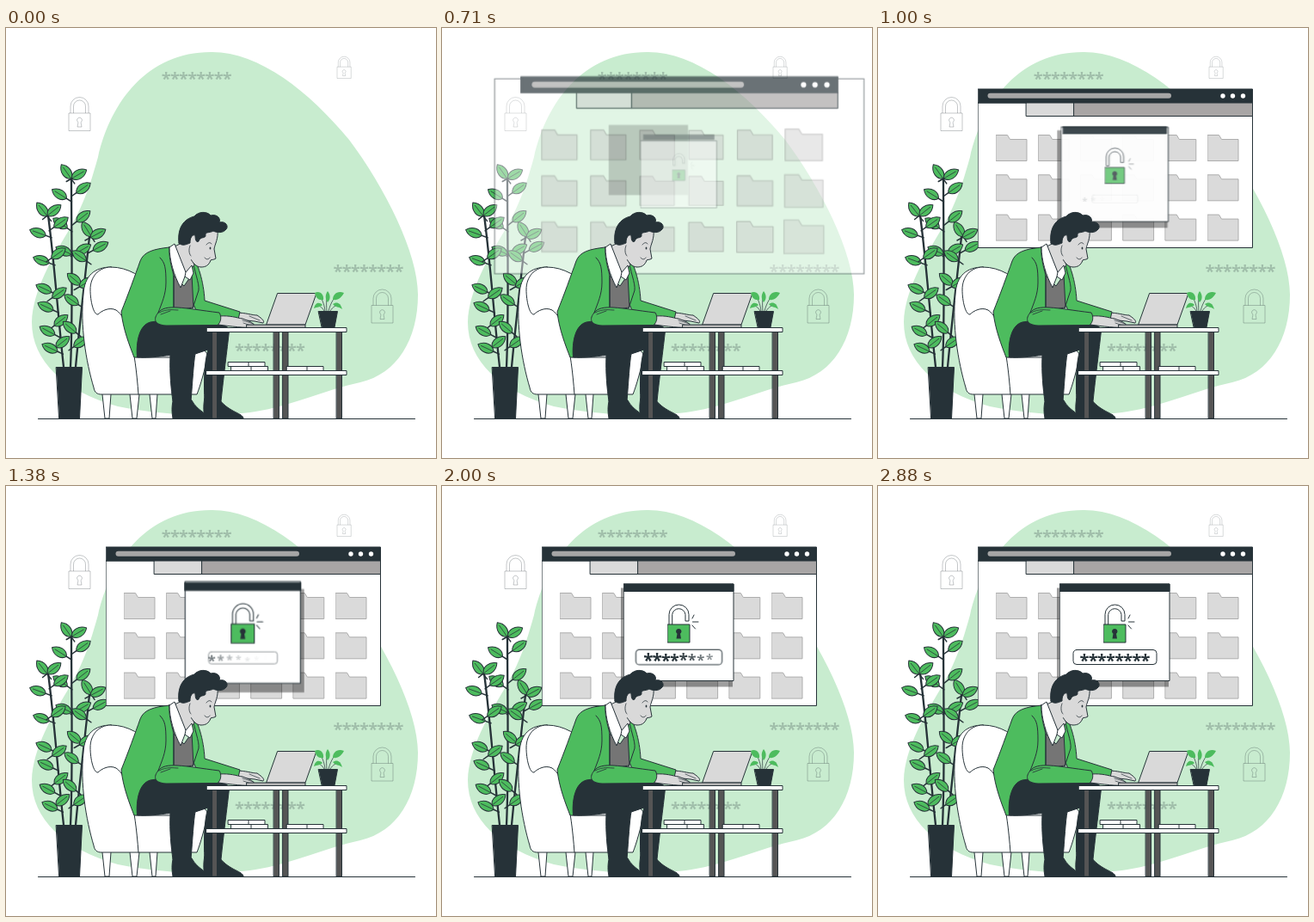
These frames come from a looping animation (500 by 500 pixels, 2.96 s). An HTML page:

```html
<!DOCTYPE html>
<html lang="en">
<head>
<meta charset="utf-8">
<title>Password entry</title>
<style>
html, body { margin: 0; width: 100%; height: 100%; overflow: hidden; background: #fff; }
svg { display: block; width: 100%; height: 100%; }
.ink { fill: none; stroke: #263238; stroke-width: 1; stroke-linejoin: round; stroke-linecap: round; }
.dark { fill: #263238; }
.green { fill: #4dbc5e; }
.white { fill: #fff; }
.skin { fill: #d9d9d9; }
.gray { fill: #555; }
.flat { stroke: none; }
.faint { fill: none; stroke: #263238; stroke-opacity: .27; }
text { font: 700 20px "Open Sans", "Liberation Sans", sans-serif; text-anchor: middle; fill: #263238; stroke: none; }
[data-z] { transform-box: fill-box; transform-origin: center; }
[data-o] { transform-box: view-box; }
</style>
</head>
<body>
<svg viewBox="0 0 500 500">
  <defs>
    <g id="lock">
      <path d="M0 0H25V20.5H0ZM2 0V-8A10.5 10.5 0 0 1 23-8V0M5.5 0V-8A7 7 0 0 1 19.5-8V0"/>
      <path d="M11 10.6A2.9 2.9 0 1 1 14 10.6L15 16H10Z"/>
    </g>
    <g id="leaf">
      <path d="M-17 0H-10" stroke-width="1.500"/>
      <path class="green" d="M-10 0C-6-7 4-7 10 0C4 7-6 7-10 0Z"/>
      <path d="M-10 0H6" stroke-width=".7"/>
    </g>
  </defs>

  <path fill="#c8eccf" d="M238 28C293 27 352 73 399 130C441 186 479 262 479 310C479 362 455 402 412 412C370 421 330 440 290 446C250 452 190 452 130 440C67 422 30 387 30 342C31 305 55 265 75 232C93 200 100 175 107 150C122 85 165 28 238 28Z"/>
  <g class="faint">
    <use href="#lock" x="73" y="99"/>
    <use href="#lock" x="425" y="322.5"/>
    <use href="#lock" transform="translate(385 45.2)scale(.65)"/>
  </g>
  <g id="rows" opacity=".24"></g>
  <path class="ink" d="M37.500 454.500H475.500"/>

  <g class="ink" id="plant">
    <g stroke-width="2.300">
      <path d="M75 394C78 330 76 250 76 174"/>
      <path d="M67 394C60 330 56 270 49 218"/>
      <path d="M81 394C86 340 92 290 97 243"/>
    </g>
    <g id="leaves"></g>
    <path class="dark" d="M58.500 394.500H88.500L85.500 454H62Z"/>
  </g>

  <!-- browser window -->
  <g class="ink" data-z="475 500 1.5" data-o="276 163">
    <path class="white" data-z="480 500 1.5" d="M116.500 87H435.500V255.500H116.500Z"/>
    <g id="folders" stroke="#adadad"></g>
    <path class="dark" d="M116.500 71H435.500V87H116.500Z"/>
    <rect class="flat" x="127.500" y="75.800" width="213.500" height="6" rx="3" fill="#a6a6a6"/>
    <g class="white flat"><circle cx="401" cy="79" r="2.700"/><circle cx="412.500" cy="79" r="2.700"/><circle cx="424.500" cy="79" r="2.700"/></g>
    <path fill="#dadada" d="M172.500 87H228V102.500H172.500Z"/>
    <path fill="#a8a5a5" d="M228 87H435.500V102.500H228Z"/>
  </g>

  <!-- password dialog -->
  <g class="ink" data-z="30 1480 .5" data-o="275 170">
    <rect class="flat" data-z="0 1480 .5" data-o="0 0" x="208" y="118.500" width="130" height="115" fill="#000" fill-opacity=".38"/>
    <rect class="white" data-z="30 1480 .5" x="211.500" y="114" width="127.500" height="112.500"/>
    <rect class="dark" data-z="110 1480 .5" x="211.500" y="114" width="127.500" height="8.500"/>
    <path class="white" data-z="230 1480 .5" d="M264 161V149.500A11.500 11.500 0 0 1 287 149.500V157H283V149.500A7.700 7.700 0 0 0 267.700 149.500V161Z"/>
    <g data-z="220 1480 .5">
      <path class="green" d="M262.500 161H288V182H262.500Z"/>
      <path class="dark flat" d="M273.500 171.800A3.200 3.200 0 1 1 277 171.800L278 177.500H272.500Z"/>
    </g>
    <path data-z="400 1480 .5" d="M291 154L293 150M291.500 158H298M291 162L294.500 166"/>
    <rect class="white" data-z="740 1480 .5" x="227" y="190.500" width="97" height="17" rx="4"/>
    <g id="typed"></g>
  </g>

  <!-- chair -->
  <g class="ink white">
    <path class="white" d="M112 426L115 454H120L122 426M144 426L147 454H152L155 426M167 426L170 454H174L176 426"/>
    <path class="white" d="M122 278C103 278 91 288 90 310C86 345 93 388 102 418C103 424 106 426 111 426H222C226 416 231 398 235 380L170 300C158 290 143 278 122 278Z"/>
    <path d="M122 278C107 278 98 290 98 304C98 318 102 334 107 333C111 329 120 324 128 328C142 337 150 372 154 426M152 383H196"/>
  </g>

  <!-- far desk legs -->
  <path class="ink gray" d="M311.500 353.500H317.500V454H311.500ZM322 353.500H328V454H322ZM384.500 353.500H390.500V454H384.500Z"/>

  <!-- person -->
  <g class="ink">
    <path class="dark" d="M195 430C192 440 193 448 194 454H235C235 448 223 446 216 433Z"/>
    <path class="dark" d="M231 430C229 440 230 448 231 454H276C276 448 260 447 249 433Z"/>
    <path class="dark" d="M160 345C150 358 151 378 153 383C173 384 188 380 191 381C190 400 192 420 194 434H215C217 410 218 390 220 379L235 374C230 390 230 415 231 434H250C253 405 257 375 259.500 352C258 344 245 341 235 341L175 338Z"/>
    <path class="skin" d="M268 331C279 331 286 334 292 334C298 338 301 341 299 343L289 341L270 339Z"/>
    <path class="green" d="M215 262C223 272 230 295 231 317L272 330L270 339L222 331C212 310 211 280 215 262Z"/>
    <path d="M194 287L207 300L216 287L218 325L195 328Z" fill="#757575"/>
    <path class="green" d="M190 255C172 257 160 260 156 271C150 288 142 310 134 330C136 350 144 370 149 383L152.500 383C151 365 155 345 168 342L195 338L195 288C192 276 189 265 190 255Z"/>
    <path d="M190 255L195 286L195 326M216 264C219 285 225 296 224 305L217 326M179 267C185 273 186 279 186 296C186 310 181 320 177 331"/>
    <path class="skin" d="M196 254L211 247L219 276L208 285Z"/>
    <path class="white" d="M190 255L196 251L209 284L216 276L218 285L214 293L208 289L203 302C195 287 190 270 190 255Z"/>
    <path d="M209 284L208 289"/>
    <path class="skin" d="M248 335C261 334 268 337 275 338C283 341 291 344 288 348C279 349 261 347 247 345Z"/>
    <path d="M276 343L285 346M275 340L288 344M283 335L295 340" stroke-width=".7"/>
    <path class="green" d="M177 331C185 320 207 326 248 331C251 336 250 342 246 345.500L186 346C172 345 171 338 177 331Z"/>
    <path d="M178 331C188 326 194 328 200 328M180 333L191 329" stroke-width=".8"/>
    <path class="skin" d="M220 234L246 235C247 245 243 251 242 257L244 268C241 270 239 269 238 270C236 276 232 278 227 278C221 278 217 273 214 267L212 250Z"/>
    <path class="flat skin" d="M206 252L216 247L219 268L213 270Z"/>
    <path d="M214 253C212 258 213 263 215 265M231 267C233 270 236 269 237 267M233 252C235 249 238 249 239 251" stroke-width=".8"/>
    <ellipse class="dark flat" cx="237.500" cy="256" rx=".9" ry="1.500"/>
    <path class="dark" d="M201 250C199 232 207 222 219 219C224 213 234 213 238 218C246 216 250 222 248 226C256 224 259 231 256 234C252 239 245 238 241 236C236 239 231 236 232 242C231 245 226 242 224 248C221 250 220 246 220 241C216 240 214 244 214 250C209 252 205 254 201 250Z"/>
  </g>

  <!-- desk -->
  <g class="ink">
    <path class="gray" d="M240 353.500H245.500V454H240Z"/>
    <path class="white" d="M258.500 388.500H301V393.500H258.500ZM262 393.500H304.500V398.500H262ZM326.500 393.500H369V398.500H326.500ZM282 388.500V393.500M285 393.500V398.500M350 393.500V398.500"/>
    <path class="white" d="M233.500 348.500H396V353.500H233.500ZM233 398.500H396V403.500H233Z"/>
    <path class="skin" d="M316 308.500H361L348 345H303Z"/>
    <path d="M280 345H348V348.500H280Z" fill="#b5b5b5"/>
    <path stroke-width=".7" d="M371 329C370 320 367 314 364 311M373 329C372 318 373 314 374 309M375 329C378 318 382 313 386 310M377 329C380 324 384 322 388 322M370 329C367 324 364 322 361 324"/>
    <path class="green flat" d="M359 308C365 305 370 310 369 316C364 317 360 314 359 308ZM393 308C385 305 380 310 380 316C387 317 390 313 393 308ZM358 326C360 318 365 319 368 322C365 325 362 324 358 326ZM391 327C389 319 384 318 380 321C383 325 387 324 391 327ZM374 306C378 311 377 316 374 319C371 315 371 310 374 306Z"/>
    <path class="dark" d="M363.500 329.500H385.500L382 348H367.500Z"/>
  </g>
</svg>
<script>
const LOOP = 2960, NS = 'http://www.w3.org/2000/svg';
const $ = id => document.getElementById(id);
const range = n => [...Array(n).keys()];

function add(parent, tag, attrs, text) {
  const el = document.createElementNS(NS, tag);
  for (const k in attrs) el.setAttribute(k, attrs[k]);
  if (text) el.textContent = text;
  return parent.appendChild(el);
}

// Rows of asterisks: centre of the first one, then a fixed pitch
const starX = x => range(8).map(i => x + i * 10.15);
for (const [x, y] of [[186.2, 55], [386, 279], [271.5, 371]])
  add($('rows'), 'text', { x: starX(x).join(' '), y: y + 11.2 }, '********');
starX(240).forEach((x, i) => add($('typed'), 'text', {
  x, y: 210, 'data-z': `${720 + i * 100} 1480 .5`, 'data-o': `${x} 199.5`
}, '*'));

for (const c of range(6)) for (const r of range(3))
  add($('folders'), 'path', {
    d: `M${137.5 + c * 49.2} ${124.5 + r * 46.3}h13l3 5h19.500v25h-35.500z`,
    fill: '#dadada', 'data-z': `${120 + c * 60 + r * 20} 500 1.5`
  });

// Leaves as x, y, direction
const leaves = [
  [70, 167, 235], [85, 170, -30], [62, 193, 212], [90, 186, -35], [90, 219, -38], [63, 227, 215],
  [67, 259, 205], [90, 257, -30], [42, 211, 232], [56, 212, -38], [37, 238, 200], [64, 226, -35],
  [41, 270, 200], [61, 262, -35], [44, 303, 205], [62, 308, -35], [46, 324, 205], [64, 340, -38],
  [48, 352, 208], [66, 365, -38], [51, 372, 205], [94, 234, 238], [107, 239, -28], [110, 254, -28],
  [85, 265, 215], [79, 292, 220], [94, 296, -30], [76, 316, 215], [74, 348, 220], [87, 365, -35]
];
for (const [x, y, a] of leaves)
  add($('leaves'), 'use', { href: '#leaf', transform: `translate(${x} ${y})rotate(${a})` });

// data-z: start, duration, first scale; data-o: scaling centre
const pct = ms => (ms / LOOP * 100).toFixed(3) + '%';
let css = '';
document.querySelectorAll('[data-z]').forEach((el, i) => {
  const [start, time, from] = el.dataset.z.split(' ').map(Number);
  css += `@keyframes zoom${i} {
    0%, ${pct(start)} { opacity: 0; transform: scale(${from}); animation-timing-function: cubic-bezier(.36, -.01, .5, 1.38); }
    ${pct(start + time)}, to { opacity: 1; transform: scale(1); }
  }\n`;
  if (el.dataset.o) el.style.transformOrigin = el.dataset.o.split(' ').map(v => v + 'px').join(' ');
  el.style.animation = `zoom${i} ${LOOP}ms infinite`;
});
document.head.appendChild(document.createElement('style')).textContent = css;
</script>
</body>
</html>
```
